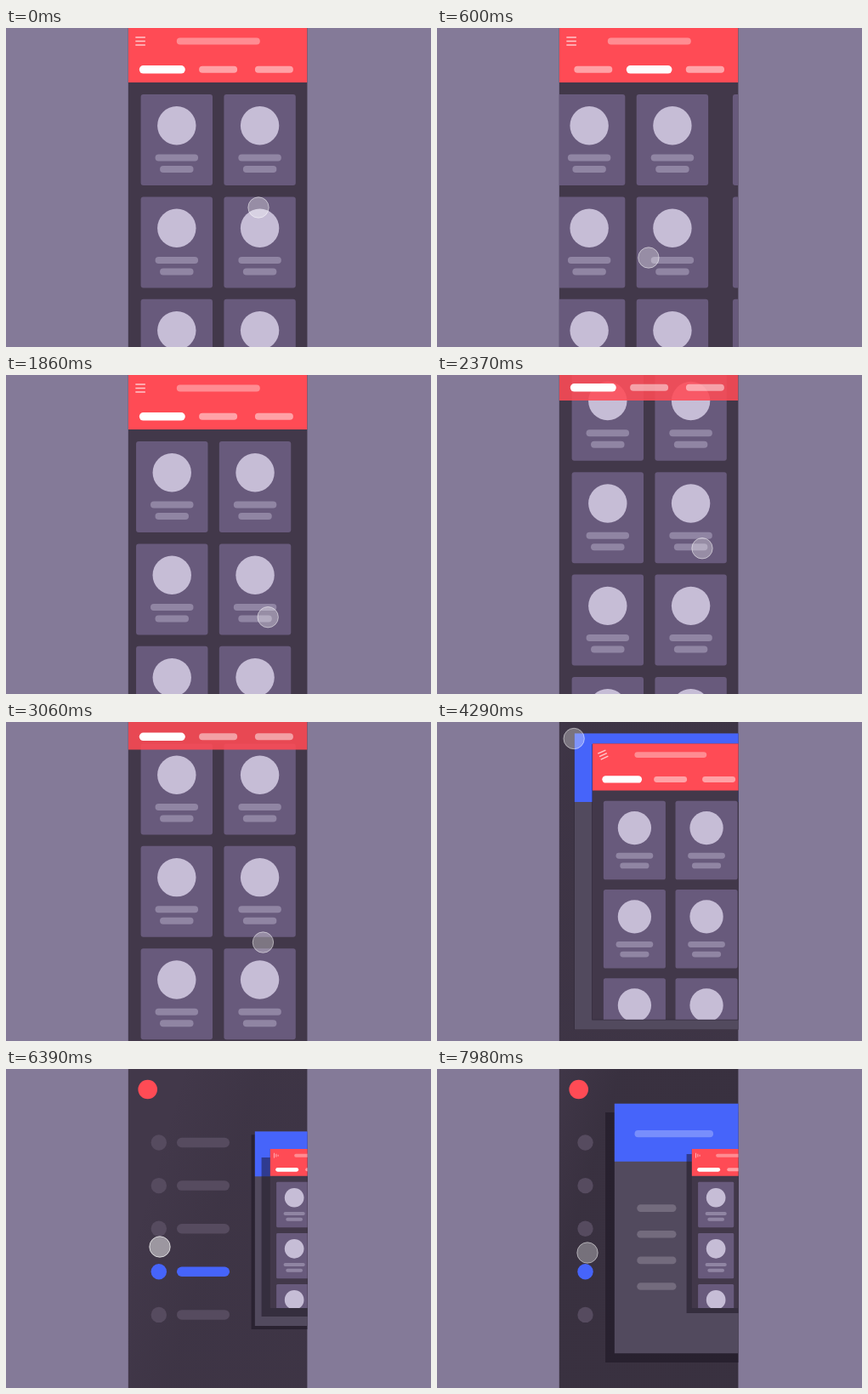
These frames come from a looping animation (500x375 px, 8000 ms). An HTML page with a canvas:

```html
<!DOCTYPE html>
<html lang="en">
<head>
<meta charset="utf-8">
<title>Phone menu</title>
<style>
html, body { margin: 0; width: 100%; height: 100%; overflow: hidden; background: #847a98; }
canvas { display: block; width: 100vw; height: 100vh; }
</style>
</head>
<body>
<canvas id="stage"></canvas>
<script>
const W = 500, H = 375, LOOP = 8000;
const PHONE = { x: 143.6, w: 211 };
const RED = '#ff4b55', BLUE = '#4664fa', DARK = '#42384a';
const canvas = document.getElementById('stage');
const ctx = canvas.getContext('2d');
const ratio = window.devicePixelRatio || 1;
canvas.width = W * ratio;
canvas.height = H * ratio;

const clamp = v => Math.max(0, Math.min(1, v));
const mix = (a, b, p) => a + (b - a) * p;
const inOut = u => u < .5 ? 2 * u * u : 1 - 2 * (1 - u) * (1 - u);
const out = u => 1 - (1 - u) ** 3;
const smooth = u => u * u * (3 - 2 * u);
const step = (t, start, length, ease = inOut) => ease(clamp((t - start) / length));
const white = a => `rgba(255,255,255,${a})`;

// Two swipes forward, two back, then one scroll down and up again.
const pageAt = t => step(t, 60, 300) + step(t, 533, 300) - step(t, 1076, 340) - step(t, 1560, 340);
const scrollAt = t => 112 * (step(t, 2047, 500) - step(t, 2700, 700));

// Places where the finger turns; it eases from each to the next.
const TURNS = [
  { t: 0, x: 297, y: 211 },
  { t: 530, x: 258, y: 270 },
  { t: 860, x: 160, y: 270 },
  { t: 1416, x: 290, y: 269 },
  { t: 2047, x: 312, y: 288 },
  { t: 2547, x: 312, y: 176 },
  { t: 3300, x: 300, y: 280 },
  { t: 4000, x: 161, y: 18 },
  { t: 4150, x: 161, y: 18 },
  { t: 6390, x: 181, y: 209 },
  { t: LOOP, x: 177, y: 216 }
];

function fingerAt(t) {
  const i = TURNS.findIndex(turn => turn.t > t);
  const a = TURNS[i - 1], b = TURNS[i];
  const p = step(t, a.t, b.t - a.t);
  return { x: mix(a.x, b.x, p), y: mix(a.y, b.y, p) };
}

function rect(x, y, w, h, fill, r = 0) {
  ctx.fillStyle = fill;
  ctx.beginPath();
  ctx.roundRect(x, y, w, h, r);
  ctx.fill();
}
function disc(x, y, r, fill) {
  ctx.fillStyle = fill;
  ctx.beginPath();
  ctx.arc(x, y, r, 0, Math.PI * 2);
  ctx.fill();
}
function pill(cx, cy, w, h, fill) {
  rect(cx - w / 2, cy - h / 2, w, h, fill, h / 2);
}

function card(x, y) {
  const cx = x + 42.2;
  rect(x, y, 84.4, 107, '#685a7c', 3);
  disc(cx, y + 36.8, 22.7, '#c6bdd6');
  pill(cx, y + 74.5, 50.5, 8, '#9085a3');
  pill(cx, y + 88, 39.5, 8, '#9085a3');
}

// Three bars that turn upright and taper into an arrow.
function menuIcon(open) {
  ctx.save();
  ctx.translate(14.5, 15.5);
  ctx.rotate(-open * Math.PI / 2);
  for (let i = 0; i < 3; i++) {
    const w = 11.5 * (1 - open * open * i / 3);
    rect(-w / 2, -5.3 + i * 4.5, w, 1.6, white(.7));
  }
  ctx.restore();
}

function gallery(t, open) {
  const page = pageAt(t), scroll = scrollAt(t);
  rect(0, 0, PHONE.w, H, DARK);
  for (let p = 0; p < 3; p++) {
    const x = (p - page) * PHONE.w;
    for (let row = 0; row < 5; row++) {
      const y = 78 + row * 120.4 - scroll;
      card(x + 15, y);
      card(x + 112.8, y);
    }
  }
  const lift = Math.min(34, scroll * .6);
  ctx.save();
  ctx.translate(0, -lift);
  ctx.globalAlpha = 1 - lift / 34 * .13;
  rect(0, 0, PHONE.w, 64, RED);
  ctx.globalAlpha = 1;
  menuIcon(open);
  pill(106.2, 15.5, 98, 8, white(.36));
  for (let i = 0; i < 3; i++) {
    const on = smooth(clamp(1 - Math.abs(i - page)));
    pill(40.2 + i * 65.8, 48.8, 45 + 9 * on, 8 + 1.6 * on, white(.48 + .52 * on));
  }
  ctx.restore();
}

function section() {
  rect(0, 0, PHONE.w, H, '#524a5e');
  rect(0, 0, PHONE.w, 87, BLUE);
  pill(89.5, 45.5, 118, 10.5, white(.27));
  for (let i = 0; i < 4; i++) pill(63.5, 157 + i * 39.1, 59, 11, '#736b7d');
}

// A vertically centred, scaled screen with a hard shadow down and to the left.
function panel(x, scale, shadow, draw) {
  const y = H / 2 * (1 - scale);
  rect(x - shadow, y + shadow, PHONE.w * scale, H * scale, 'rgba(22,16,28,.48)');
  ctx.save();
  ctx.translate(x, y);
  ctx.scale(scale, scale);
  ctx.beginPath();
  ctx.rect(0, 0, PHONE.w, H);
  ctx.clip();
  draw();
  ctx.restore();
}

function menu(t, grow, edge) {
  rect(PHONE.x, 0, PHONE.w, H, DARK);
  const shade = ctx.createLinearGradient(edge - 85, 0, edge, 25);
  shade.addColorStop(0, 'rgba(36,32,40,0)');
  shade.addColorStop(1, `rgba(36,32,40,${.14 + .16 * grow})`);
  rect(PHONE.x, 0, PHONE.w, H, shade);

  disc(166.7, 24, 11.3 * step(t, 4750, 400, out), RED);
  for (let i = 0; i < 5; i++) {
    const show = step(t, 4500 + i * 80, 420, out);
    const color = i === 3 ? BLUE : '#564b5f';
    const y = 86.5 + i * 50.6;
    disc(mix(179.8, 174.5, grow), y, 9.2 * show, color);
    ctx.globalAlpha = show * (1 - clamp(grow * 1.7));
    pill(232 - 14 * (1 - show) - 8 * grow, y, 62, 11.5, color);
    ctx.globalAlpha = 1;
  }
}

function finger(t) {
  const { x, y } = fingerAt(t);
  const press = Math.exp(-(((t - 6390) / 250) ** 2));
  disc(x, y, 12.2, white(.31 + .17 * press));
  ctx.strokeStyle = white(.5 + .2 * press);
  ctx.lineWidth = 1;
  ctx.stroke();
}

function draw(t) {
  ctx.setTransform(canvas.width / W, 0, 0, canvas.height / H, 0, 0);
  rect(0, 0, W, H, '#847a98');
  ctx.save();
  ctx.beginPath();
  ctx.rect(PHONE.x, 0, PHONE.w, H);
  ctx.clip();

  const front = step(t, 4065, 617);
  const back = step(t, 4080, 700);
  const grow = step(t, 6950, 850, out);
  if (front > 0) {
    const backX = PHONE.x + 149 * back ** 1.24 - 84 * grow;
    menu(t, grow, backX);
    panel(backX, 1 - .39 * back + .174 * grow, 4 * back * back + 6.5 * grow, section);
  }
  panel(PHONE.x + 167 * front ** 1.1 - 11 * grow, 1 - .501 * front,
    10 * front * front - 4 * grow, () => gallery(t, front));
  finger(t);
  ctx.restore();
}

const begin = performance.now();
function tick() {
  draw(Math.max(0, performance.now() - begin) % LOOP);
  requestAnimationFrame(tick);
}
tick();
</script>
</body>
</html>
```
